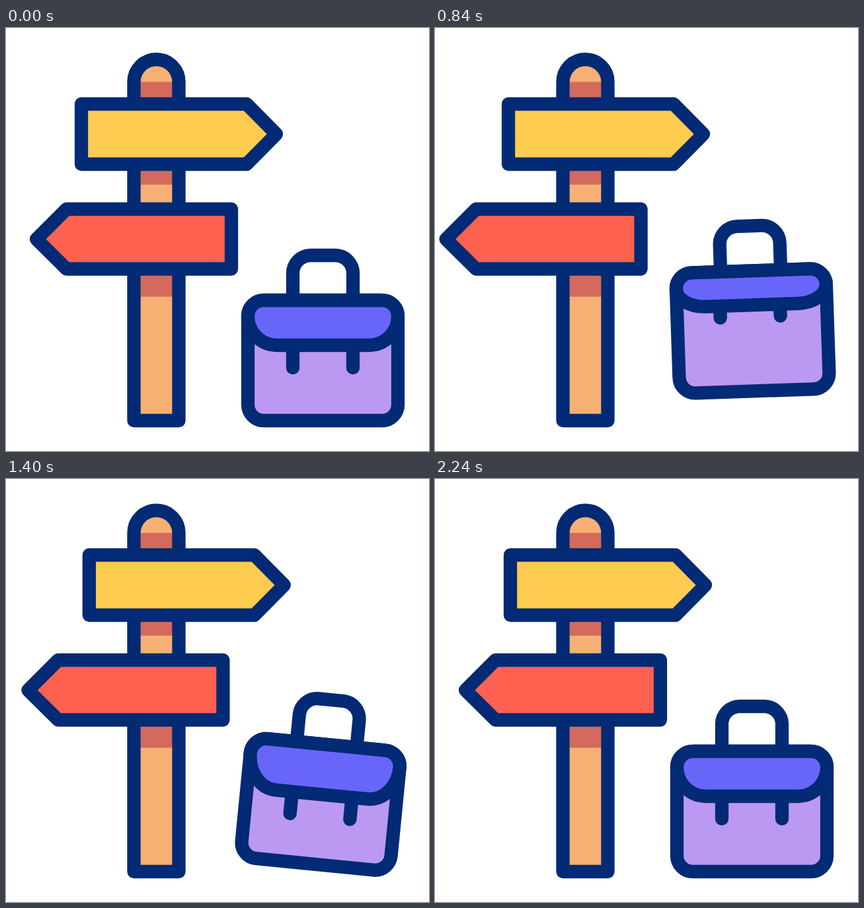
These frames come from a looping animation (640x640 px, 2480 ms). An HTML page:

```html
<!DOCTYPE html>
<html lang="en">
<head>
<meta charset="utf-8">
<title>Signpost and briefcase</title>
<style>
  html, body { margin: 0; width: 100%; height: 100%; overflow: hidden; background: #fff; }
  svg { display: block; width: 100%; height: 100%; }
  .ink { stroke: #032a74; stroke-width: 20.3; stroke-linejoin: round; }
  .line { fill: none; }
  .cap { stroke-linecap: round; }
</style>
</head>
<body>
<svg viewBox="0 0 640 640">
  <path fill="#f6b074" d="M193.5 594V81.5a34 34 0 0 1 68 0V594Z"/>
  <path fill="#d36a5c" d="M193.5 81.5h68V115h-68ZM193.5 206h68v31h-68ZM193.5 365h68v41.5h-68Z"/>
  <path class="ink line" d="M193.5 594V81.5a34 34 0 0 1 68 0V594Z"/>
  <path id="yellow" class="ink" fill="#fdcb50" d="M114 115H364L409 160.5 364 206H114Z"/>
  <path id="red" class="ink" fill="#ff6150" d="M341 274H91.5L46 319.5 91.5 364.500H341Z"/>
  <g id="bag">
    <path class="ink line" d="M434 412V371a27 27 0 0 1 27-27H498a27 27 0 0 1 27 27V412"/>
    <rect class="ink" fill="#bb99f2" x="366" y="412" width="227" height="182" rx="24"/>
    <path id="straps" class="ink line cap"/>
    <path id="flap" class="ink" fill="#6865f9"/>
  </g>
</svg>
<script>
  const LOOP = 2480, STEP = 40, LAST = 2240;
  const el = id => document.getElementById(id);
  const [yellow, red, bag, straps, flap] =
    ['yellow', 'red', 'bag', 'straps', 'flap'].map(el);

  // Eases from rest through each peak, one per beat, and back to rest.
  function swing(t, beat, ...peaks) {
    const stops = [0, ...peaks, 0];
    const pos = Math.max(0, Math.min(t / beat, stops.length - 1));
    const i = Math.min(Math.floor(pos), stops.length - 2);
    const p = pos - i;
    return stops[i] + (stops[i + 1] - stops[i]) * p * p * (3 - 2 * p);
  }

  // A single soft bounce: up and down once between two times.
  function hop(t, from, to, height) {
    const u = Math.max(0, Math.min((t - from) / (to - from), 1));
    return height * Math.sin(Math.PI * u) ** 2;
  }

  const slide = t => swing(t, 320, 31, -29.5, 18, -17.3);

  function draw(t) {
    yellow.setAttribute('transform', `translate(${-slide(t)} 0)`);
    red.setAttribute('transform', `translate(${slide(t - 193)} 0)`);

    const lift = hop(t, 530, 1240, 46.4) + hop(t, 1240, 1660, 12.1) + hop(t, 1660, 2200, 6.2);
    const tilt = swing(t - 700, 370, -6, 6, -3.4);
    bag.setAttribute('transform', `translate(0 ${-lift}) rotate(${tilt} 479.5 469)`);

    // The straps follow the flap, pulling in further than they hang out.
    const fold = swing(t - 540, 425, -20.5, 8, -8.9);
    const pull = fold * (fold < 0 ? 2 : 0.9);
    const drop = 44 + fold, low = 436 + drop, tip = 514 + pull;
    const left = 434 + pull * 0.085;
    flap.setAttribute('d', `M366 436A24 24 0 0 1 390 412H569A24 24 0 0 1 593 436` +
      `A44 ${drop} 0 0 1 549 ${low}H410A44 ${drop} 0 0 1 366 436Z`);
    straps.setAttribute('d', `M${left} ${low}V${tip}M${left + 91} ${low}V${tip}`);
  }

  const start = performance.now();
  function tick() {
    const t = (performance.now() - start) % LOOP;
    draw(Math.min(LAST, Math.floor(t / STEP) * STEP));
    requestAnimationFrame(tick);
  }
  tick();
</script>
</body>
</html>
```
